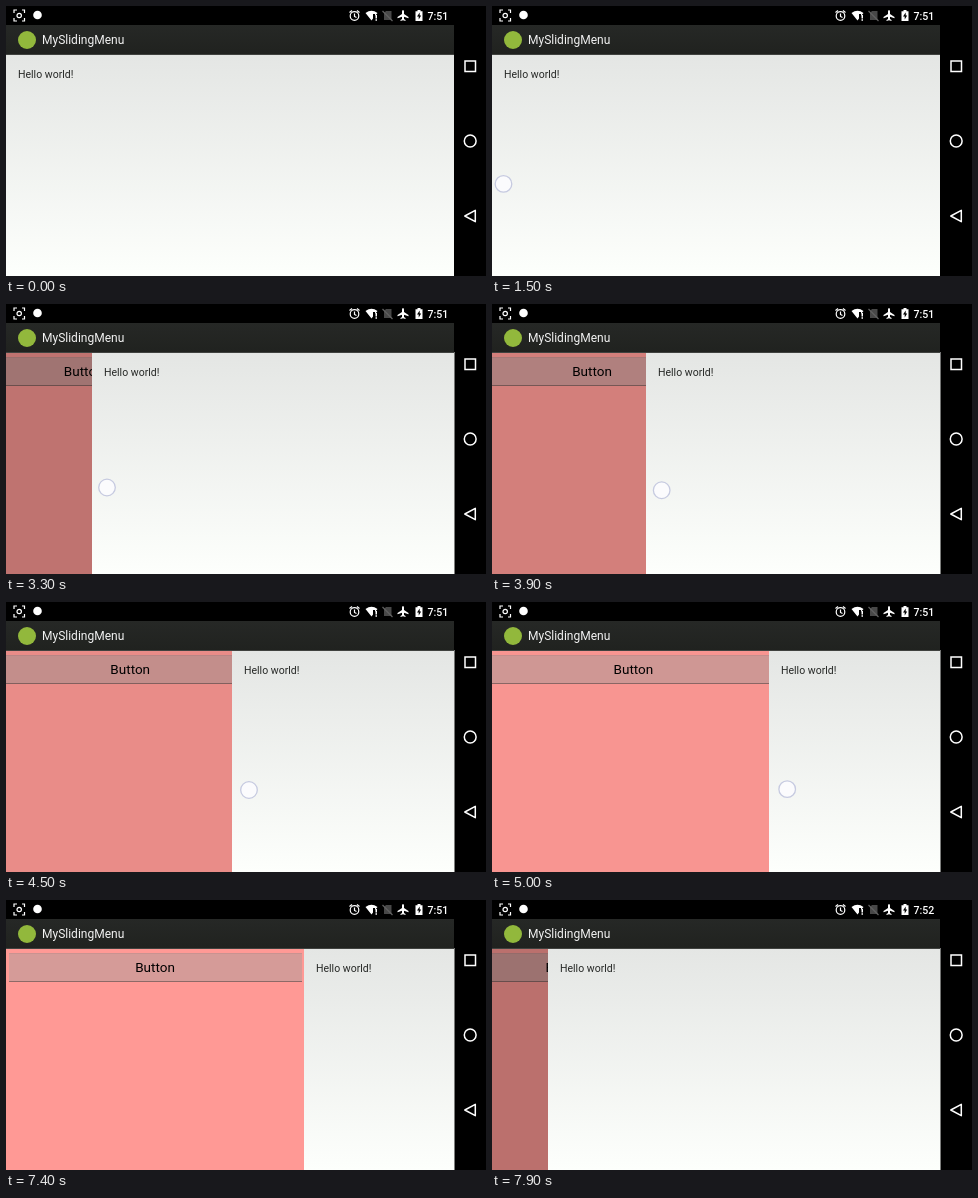
Write an HTML page that moves like this. It is 480x270 px and loops after 8 s.

```html
<!DOCTYPE html>
<html lang="en">
<head>
<meta charset="utf-8">
<title>Sliding menu</title>
<style>
  html, body { margin: 0; width: 100%; height: 100%; overflow: hidden; background: #000; }
  svg { display: block; width: 100%; height: 100%; font-family: Roboto, sans-serif; }
  .line { fill: none; stroke: #fff; }
</style>
</head>
<body>
<svg viewBox="0 0 480 270">
  <defs>
    <linearGradient id="paper" x1="0" y1="0" x2="0" y2="1">
      <stop offset="0" stop-color="#e4e6e4"/>
      <stop offset="1" stop-color="#fdfffc"/>
    </linearGradient>
    <linearGradient id="bar" x1="0" y1="0" x2="0" y2="1">
      <stop offset="0" stop-color="#262826"/>
      <stop offset="1" stop-color="#20221f"/>
    </linearGradient>
  </defs>

  <g id="menu">
    <rect x="0" y="48" width="298" height="222" fill="#ff9995"/>
    <rect x="3" y="53" width="293" height="29" fill="#d59b98"/>
    <path d="M3 81.5H296" stroke="#8e6967"/>
    <path d="M3 53.5H296" stroke="#c99290"/>
    <text x="149" y="72" font-size="13.5" text-anchor="middle">Button</text>
  </g>
  <rect id="shade" y="48" width="298" height="222"/>

  <g id="content">
    <rect y="48" width="448" height="222" fill="url(#paper)"/>
    <text x="12" y="72" font-size="10.5" fill="#262826">Hello world!</text>
  </g>
  <circle id="touch" r="8.3" fill="#fcfcfe" fill-opacity=".9" stroke="#c6cae0" stroke-width="1.3"/>

  <!-- action bar -->
  <rect y="19" width="448" height="30" fill="url(#bar)"/>
  <path d="M0 48.5H448" stroke="#40423f"/>
  <circle cx="21" cy="34" r="9" fill="#92b83c"/>
  <text x="36" y="38" font-size="12" fill="#f3f3f3">MySlidingMenu</text>

  <!-- status bar -->
  <rect width="480" height="19"/>
  <g class="line" stroke-width="1.2">
    <path d="M8 7V4H11M16 4H18.500V7M18.500 12V15H16M11 15H8V12"/>
    <circle cx="13.200" cy="9.500" r="2.200"/>
    <circle cx="348.500" cy="10" r="4.300"/>
    <path d="M348.500 7.500V10.500L350.500 11.500M343.500 6.500L346 4.500M351 4.500L353.500 6.500"/>
  </g>
  <g fill="#fff">
    <circle cx="31.500" cy="9" r="4.300"/>
    <path d="M359.500 7Q365.500 2.500 371.500 7L369 10V8H367V12.500L365.500 14.500Z"/>
    <path d="M369.500 9H371V12.500H369.500ZM369.500 13.300H371V14.700H369.500Z"/>
    <path d="M397 4Q398 4 398 5.500V8L402.500 11V12.200L398 10.800V13L399.500 14V15L397 14.300L394.500 15V14L396 13V10.800L391.500 12.200V11L396 8V5.500Q396 4 397 4Z"/>
    <path d="M409.500 5.200H411.500V4H414.500V5.200H416.500V15H409.500Z"/>
    <text id="clock" x="421.500" y="13.500" font-size="10.600" font-weight="500">7:51</text>
  </g>
  <path d="M413.700 6.500L411 10.500H412.700V13.500L415.200 9.500H413.700Z"/>
  <path d="M380 5H385.500V14H378V7Z" fill="#484848"/>
  <path d="M376.500 5L386.500 15" stroke="#606060" stroke-width="1.200"/>

  <!-- navigation bar -->
  <rect x="448.500" y="19" width="31.500" height="251"/>
  <g class="line" stroke-width="1.5">
    <rect x="459" y="55" width="10.500" height="10.500"/>
    <circle cx="464.200" cy="135" r="5.900"/>
    <path d="M458.800 210L469.300 204.300V215.700Z" stroke-linejoin="round"/>
  </g>
</svg>

<script>
const LOOP = 8000, STEP = 100, MENU_WIDTH = 298;
const CLOSE_START = 7730, CLOSE_TIME = 600, MENU_LAG = 20;

// time, finger x, finger y
const drag = [
  [1100, 10, 178], [1700, 14, 178], [2300, 34, 179.5],
  [3300, 101, 183.5], [4500, 243, 188], [5600, 355, 185]
];

const el = id => document.getElementById(id);
const clamp = (v, lo, hi) => Math.min(hi, Math.max(lo, v));

function slope(i, axis) {
  const a = drag[Math.max(0, i - 1)], b = drag[Math.min(drag.length - 1, i + 1)];
  return (b[axis] - a[axis]) / (b[0] - a[0]);
}

// smooth curve through the drag points
function finger(t, axis) {
  t = clamp(t, drag[0][0], drag.at(-1)[0]);
  const i = Math.max(1, drag.findIndex(p => p[0] >= t)) - 1;
  const a = drag[i], b = drag[i + 1], span = b[0] - a[0];
  const u = (t - a[0]) / span, v = 1 - u;
  return a[axis] * v * v * (1 + 2 * u) + b[axis] * u * u * (3 - 2 * u)
    + span * u * v * (slope(i, axis) * v - slope(i + 1, axis) * u);
}

function slide(t) {
  if (t > CLOSE_START) {
    return MENU_WIDTH * (1 - clamp((t - CLOSE_START) / CLOSE_TIME, 0, 1)) ** 5;
  }
  return clamp(finger(t, 1) * 0.985 - 13.5, 0, MENU_WIDTH);
}

function draw(t) {
  const menuHidden = MENU_WIDTH - slide(t - MENU_LAG);
  el('content').setAttribute('transform', `translate(${Math.round(slide(t))})`);
  el('menu').setAttribute('transform', `translate(${-menuHidden / 3})`);
  el('shade').setAttribute('opacity', 0.35 * menuHidden / MENU_WIDTH);

  const dragging = t >= 1100 && t <= 5600, tapping = t >= 7500 && t <= 7700;
  const touch = el('touch');
  touch.setAttribute('visibility', dragging || tapping ? 'visible' : 'hidden');
  touch.setAttribute('cx', tapping ? 330 : finger(t, 1));
  touch.setAttribute('cy', tapping ? 185 : finger(t, 2));
  el('clock').textContent = t < 7700 ? '7:51' : '7:52';
}

function tick() {
  draw(Math.floor(performance.now() % LOOP / STEP) * STEP);
  requestAnimationFrame(tick);
}
tick();
</script>
</body>
</html>
```
